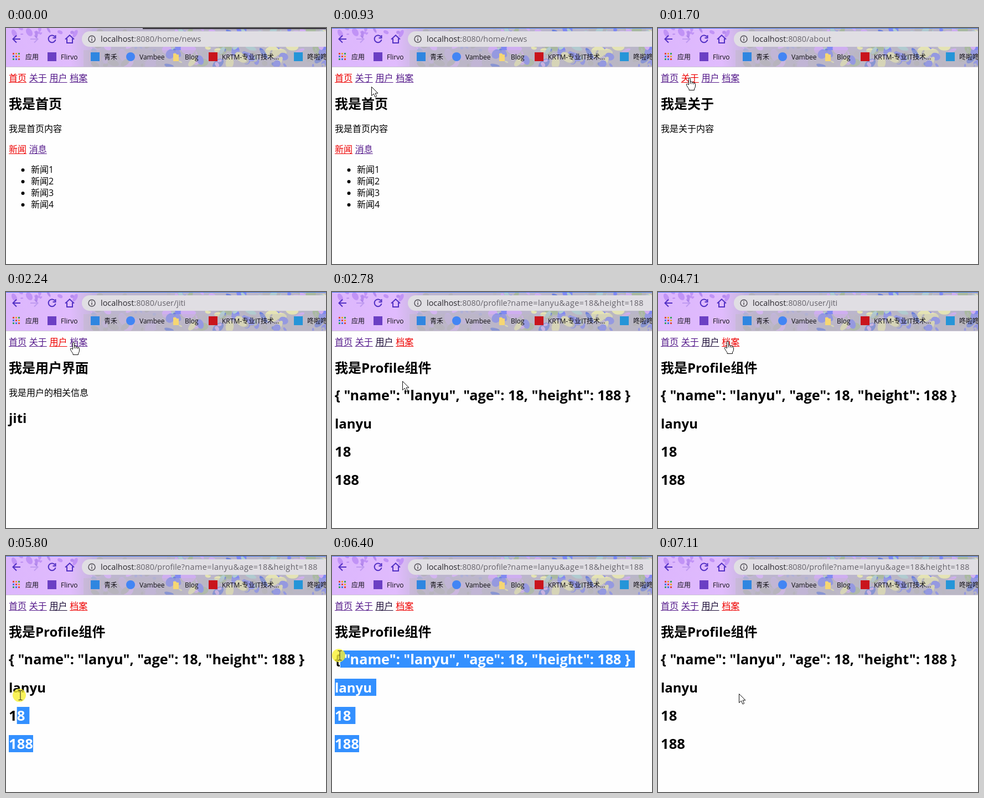
These frames come from a looping animation (578x427 px, 9.43 s). An HTML page:

```html
<!DOCTYPE html>
<html lang="zh">
<head>
<meta charset="utf-8">
<title>Router demo</title>
<style>
  html, body { margin: 0; width: 100%; height: 100%; overflow: hidden; background: #fff; }
  svg { display: block; width: 578px; height: 427px; }
  text { font-family: "Open Sans", "Noto Sans CJK SC", "Noto Sans CJK", sans-serif; white-space: pre; }
  .page { display: none; }
  .page.on { display: inline; }
  .link { fill: #551a8b; }
  .link.dark { fill: #1d0d38; }
  .link.on { fill: #ee0000; }
  .mark { font-size: 12px; fill: #100e14; }
  .icon { fill: none; stroke: #5230c4; stroke-width: 2; }
  #sel text { fill: #fff; }
  .cursor { fill: #fff; stroke: #111; stroke-width: 1; stroke-linejoin: round; }
</style>
</head>
<body>
<svg viewBox="0 0 578 427">
  <defs>
    <linearGradient id="theme">
      <stop offset="0" stop-color="#dcb6fd"/>
      <stop offset=".2" stop-color="#e0bbfd"/>
      <stop offset=".3" stop-color="#bdb5cf"/>
      <stop offset="1" stop-color="#b9b6c8"/>
    </linearGradient>
    <clipPath id="bar"><rect width="578" height="70"/></clipPath>
    <clipPath id="picked"></clipPath>
  </defs>
  <rect width="578" height="427" fill="#fefefe"/>

  <g clip-path="url(#bar)">
    <rect width="578" height="70" fill="url(#theme)"/>
    <g id="paint"></g>
    <rect x="140" y="40" width="438" height="30" fill="#b9b7be" opacity=".35"/>
    <rect id="tabs" x="247" width="331" height="2" fill="#37343c"/>
    <rect id="edge" width="578" height="1" fill="#3f77e6"/>
  </g>
  <rect y="70" width="578" height="1" fill="#cbc5d3"/>
  <rect x="137" y="6" width="470" height="28" rx="14" fill="#e0dee3"/>

  <g class="icon">
    <path d="M26 20H13M19 13.5 12.500 20 19 26.500"/>
    <path d="M44 20H57M51 13.500 57.500 20 51 26.500" opacity=".22"/>
    <path d="M88.500 16A6.500 6.500 0 1 0 89.500 21M89.500 13V18H84.500"/>
    <path d="M107 20.500 115 13 123 20.500M110 19V27H120V19"/>
  </g>
  <g fill="none" stroke="#55525a" stroke-width="1.500">
    <circle cx="155" cy="20" r="6"/>
    <path d="M155 19V23.500M155 16V17.500"/>
  </g>
  <text x="171" y="25" font-size="14.400" fill="#66636b"><tspan fill="#29272d">localhost</tspan>:8080/<tspan id="path"></tspan><tspan id="query" letter-spacing=".42"></tspan></text>

  <path d="M302 46H307L308.500 48H312V60H302Z" fill="#f6d673"/>
  <g id="marks"></g>
  <g id="nav"></g>
  <g id="pages"></g>
  <g id="sel" clip-path="url(#picked)"></g>

  <g id="pointer">
    <circle id="press" cx="-2" r="12" fill="#f8f032" opacity=".8"/>
    <path id="arrow" class="cursor" d="M.5 .5V16.500L4.300 13 7 19 9.700 17.800 7.100 12H12Z"/>
    <path id="hand" class="cursor" stroke-width="1.200" d="M-1.500 12V1.700Q-1.500 .2 0 .2T1.500 1.700V7Q4 6.200 4.500 8.200Q7 7.300 7.600 9.400Q10.500 8.600 10.500 11.500V15Q10.500 18 8.500 20V22.500H-1V20.500Q-3 18-5.500 13.500Q-6.500 11-4 11Q-2.800 11.300-1.500 13ZM1.500 7V11M4.500 8V11.500M7.600 9.500V12"/>
    <path id="beam" fill="none" stroke="#222" d="M-3.500-8.500H-1Q0-8.500 0-7.500Q0-8.500 1-8.500H3.500M0-7.500V7.500M-3.500 8.500H-1Q0 8.500 0 7.500Q0 8.500 1 8.500H3.500"/>
  </g>
</svg>

<script>
const LOOP = 9430, TICK = 77.28;
const $ = id => document.getElementById(id);
const text = (x, y, size, str, attrs = "") =>
  `<text x="${x}" y="${y}" font-size="${size}" ${attrs}>${str}</text>`;
const box = (x, y, w, h, fill = "#000", rx = 0) =>
  `<rect x="${x}" y="${y}" width="${w}" height="${h}" fill="${fill}" rx="${rx}"/>`;
const bold = (y, str, size = 24) => text(5, y, size, str, 'font-weight="700"');
const link = (x, y, str, cls = "") =>
  `<g class="link ${cls}">${text(x, y, 16, str)}${box(x, y + 2, 32, 1, "inherit")}</g>`.replace(' fill="inherit"', "");
const times = (n, fn) => Array.from({ length: n }, (_, i) => fn(i)).join("");

// Paint splashes of the browser theme
let seed = 29;
const rnd = (a, b) => a + (b - a) * (seed = seed * 16807 % 2147483647) / 2147483647;
const splashes = (n, x0, x1, y1, size, inks) => times(n, () => {
  const x = rnd(x0, x1), y = rnd(0, y1), r = rnd(2, size);
  const ink = inks[rnd(0, inks.length) | 0];
  return `<ellipse cx="${x}" cy="${y}" rx="${r}" ry="${r * rnd(.3, .9)}" fill="${ink}" transform="rotate(${rnd(0, 180)} ${x} ${y})"/>`;
});
$("paint").innerHTML =
  splashes(12, 15, 130, 12, 8, ["#c193f6", "#b78bef"]) +
  splashes(45, 150, 300, 70, 13, ["#b5b2bd", "#c4b3e2", "#d3b5f0", "#aeb0d8"]) +
  splashes(150, 290, 585, 70, 13, ["#8189f2", "#b5b4ba", "#e4e3b4", "#b0cbd0", "#cfaef0", "#b9b6c4", "#6f82dc", "#a9b9a0"]);

// Bookmarks: icon x, colour, label, corner radius
const marks = [
  [75, "#6b3fc4", "Flirvo", 0], [153, "#2f86e0", "青禾", 0], [217, "#4285f4", "Vambee", 8],
  [299, "none", "Blog", 0], [366, "#c9141c", "KRTM-专业IT技术...", 0], [520, "#2595d8", "咚啦咚啦", 0]
];
const appInks = ["#e2453c", "#e9a628", "#38a35a", "#3c78e0"];
$("marks").innerHTML =
  times(9, i => box(12 + i % 3 * 5, 45 + (i / 3 | 0) * 5, 3, 3, appInks[i % 4])) +
  text(35, 57, 12, "应用", 'class="mark"') +
  marks.map(([x, ink, label, rx]) => box(x, 44, 16, 16, ink, rx) + text(x + 24, 57, 12, label, 'class="mark"')).join("");

$("nav").innerHTML = ["首页", "关于", "用户", "档案"].map((s, i) => link(5 + 36.75 * i, 96, s)).join("");
const links = [...$("nav").children];

// Page contents
const PITCH = 51;
const details = bold(196, '{ "name": "lanyu", "age": 18, "height": 188 }', 25.2) +
  bold(247, "lanyu") + bold(298, "18", 25.7) + bold(349, "188", 25.7);
const HOME = 0, ABOUT = 1, USER = 2, PROFILE = 3;
$("pages").innerHTML = [
  bold(146, "我是首页") + text(5, 188, 16, "我是首页内容") +
    link(5, 225, "新闻", "on") + link(41.75, 225, "消息") +
    times(4, i => `<circle cx="30.500" cy="${257 + i * 21}" r="3"/>` + text(45, 262 + i * 21, 16, `新闻${i + 1}`)),
  bold(146, "我是关于") + text(5, 188, 16, "我是关于内容"),
  bold(146, "我是用户界面") + text(5, 188, 16, "我是用户的相关信息") + bold(237, "jiti"),
  bold(146, "我是Profile组件") + details
].map(v => `<g class="page">${v}</g>`).join("");
const pages = [...$("pages").children];
const paths = ["home/news", "about", "user/jiti", "profile?name=lanyu&age=18&height=188"];

$("sel").innerHTML = box(0, 160, 578, 200, "#3390ff") + details;
const lines = [...$("sel").querySelectorAll("text")];

// Clicks: tick and page opened; the address follows one tick later
const visits = [[0, HOME], [14, ABOUT], [26, USER], [31, PROFILE], [55, USER], [61, PROFILE]];
const pageAt = k => visits.filter(v => v[0] <= Math.max(k, 0)).pop()[1];

// Pointer glides: from tick, to tick, x, y; it rests in between
const glides = [
  [0, 1, 379, 378], [1, 2, 155, 241], [3, 6, 86, 118], [8, 17, 52, 90], [19, 20, 57, 90],
  [22, 29, 122, 91], [33, 39, 132, 230], [39, 48, 104, 98], [48, 50, 100, 95], [52, 53, 84, 83],
  [54, 57, 90, 88], [59, 61, 126, 89], [63, 71, 56, 366], [71, 75, 26, 252], [75, 80, 14, 180],
  [84, 88, 146, 249]
];
const DRAG = 71, RELEASE = 83, CLEAR = 92;

function pointerAt(k) {
  let x = 0, y = 0;
  for (const [from, to, tx, ty] of glides) {
    const u = Math.min(1, Math.max(0, (k - from) / (to - from)));
    x += (tx - x) * u;
    y += (ty - y) * u;
  }
  return [Math.round(x), Math.round(y)];
}

const inside = (x, y) => el => {
  const b = el.getBBox();
  return x >= b.x && x <= b.x + b.width && y >= b.y && y <= b.y + b.height;
};

function shapeAt(x, y, page, dragging) {
  if (dragging) return "beam";
  if (links.some(inside(x, y))) return "hand";
  return [...pages[page].querySelectorAll("text")].some(inside(x, y)) ? "beam" : "arrow";
}

// Letter boundary of a line nearest to x
function caret(line, x) {
  const stops = [5];
  for (let i = 0; i < line.getNumberOfChars(); i++) stops.push(line.getEndPositionOfChar(i).x);
  return stops.reduce((a, b) => Math.abs(b - x) < Math.abs(a - x) ? b : a);
}

function select(x, y) {
  const first = Math.min(3, Math.max(0, Math.floor((y - 150) / PITCH)));
  $("picked").innerHTML = lines.map((line, i) => {
    if (i < first) return "";
    const left = i === first ? caret(line, x) : 5;
    const right = 5 + line.getComputedTextLength() + (i < 3 ? 8 : 0);
    return box(left, 171 + i * PITCH, right - left, 31);
  }).join("");
}

const show = (id, on) => $(id).style.display = on ? "" : "none";

function draw(k) {
  const page = pageAt(k), [path, query] = paths[pageAt(k - 1)].split("?");
  pages.forEach((p, i) => p.classList.toggle("on", i === page));
  links.forEach((l, i) => l.classList.toggle("on", i === page));
  links[USER].classList.toggle("dark", k >= 31);
  $("path").textContent = path;
  $("query").textContent = query ? "?" + query : "";
  show("tabs", k < 9);
  show("edge", k >= 9);

  const [x, y] = pointerAt(k);
  const dragging = k >= DRAG && k < RELEASE;
  const shape = shapeAt(x, y, page, dragging);
  show("pointer", k > 0);
  $("pointer").setAttribute("transform", `translate(${x} ${y})`);
  for (const id of ["arrow", "hand", "beam"]) show(id, id === shape);
  show("press", dragging || k === CLEAR - 1);

  const selected = k >= DRAG && k < CLEAR;
  show("sel", selected);
  if (selected) select(...pointerAt(Math.min(k, RELEASE)));
}

const start = performance.now();
let shown = -1;
function frame() {
  const t = (performance.now() - start) % LOOP;
  const k = Math.floor(t / TICK + .13);
  if (k !== shown) draw(shown = k);
  requestAnimationFrame(frame);
}
frame();
</script>
</body>
</html>
```
